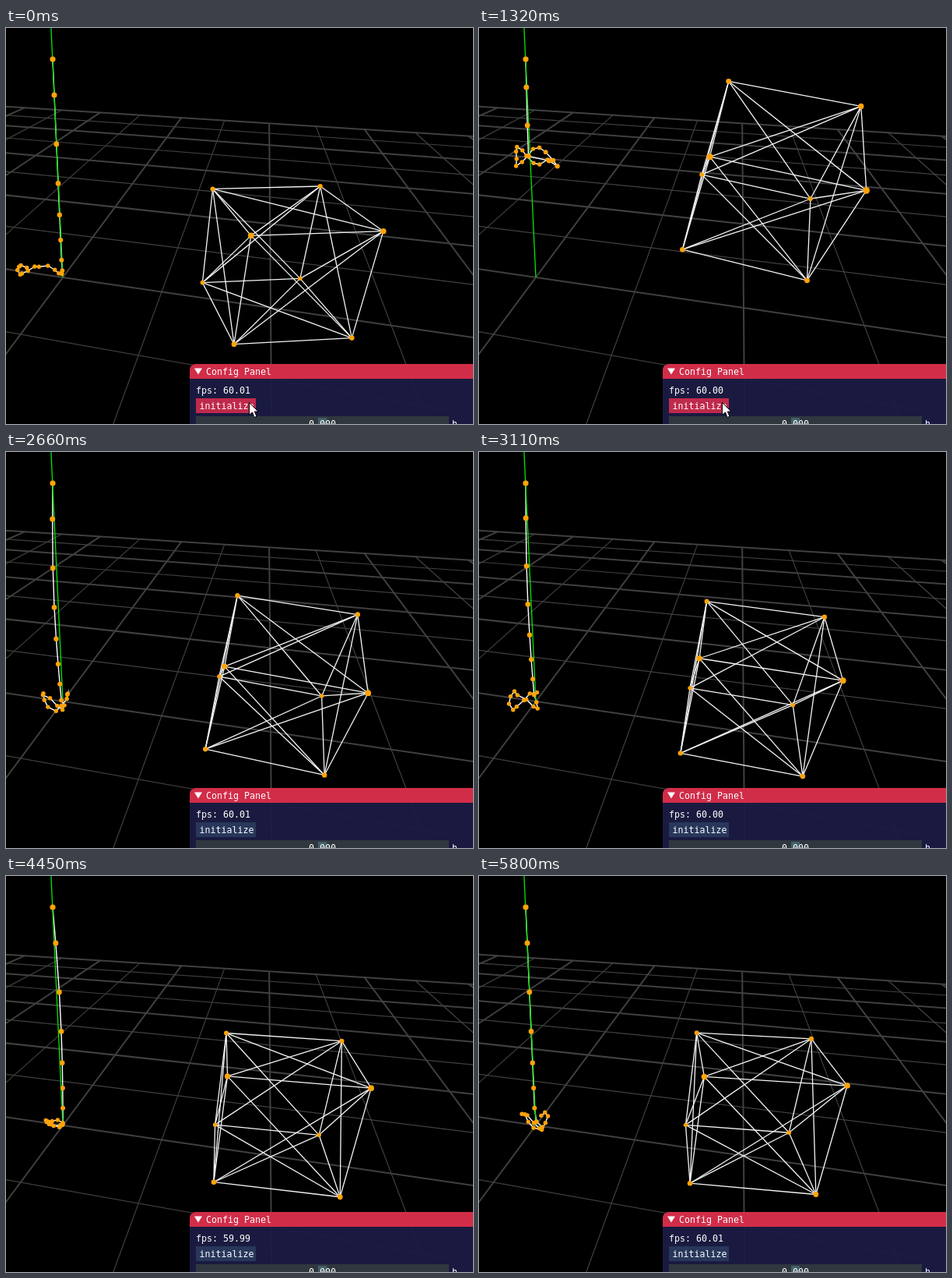
An HTML page with a canvas for the animation above (5900 ms loop, 600 by 508 pixels).

```html
<!DOCTYPE html>
<html lang="en">
<head>
<meta charset="utf-8">
<title>Spring simulation</title>
<style>
html, body { margin: 0; width: 100%; height: 100%; overflow: hidden; background: #000; }
canvas { display: block; }
</style>
</head>
<body>
<canvas id="stage" width="600" height="508"></canvas>
<script>
const ctx = document.getElementById('stage').getContext('2d');
const LOOP = 5900, STEP = 88.6, LAST_STEP = 65;
const RESET = 11.3, LEAVE = 22, NODES = 21;
const mix = (a, b, k) => a + (b - a) * k;

// z, yaw, pitch, roll: cube height and angles in degrees; drop: bounce after this key.
// x, y, rx, ry: centre and half size of the coiled rope end; bow: sideways bend.
const rest = { at: 0, fps: 60.01, z: 0.5, yaw: 21, pitch: 0, roll: 0, drop: 0,
  bow: 0, stretch: 1, x: 45, y: 311, rx: 30, ry: 6 };
const falling = { at: 15, fps: 60, z: 1.236, yaw: 0, pitch: 22, roll: 8, drop: 0.6,
  bow: -2, stretch: 0.78, x: 76, y: 165, rx: 30, ry: 11 };
const start = { ...falling, at: RESET, z: 2.25, y: 42, drop: 0 };
const keys = [
  rest,
  { ...rest, at: RESET, yaw: 23 },
  start,
  falling,
  { ...rest, at: 22, fps: 60.02, z: 0.828, yaw: 2, pitch: -6, roll: -1.5, drop: 0.25,
    stretch: 1.03, x: 72, y: 305, rx: 18, ry: 7 },
  { ...rest, at: 30, z: 0.514, yaw: 0.5, pitch: 15, roll: 4.5, drop: 0.05,
    bow: -5, x: 63, y: 321, rx: 17, ry: 11 },
  { ...rest, at: 40, fps: 59.99, z: 0.48, yaw: 2.5, roll: 1.8,
    bow: -3, stretch: 0.95, x: 55, y: 318, rx: 24, ry: 11 },
  { ...rest, at: 50, fps: 59.99, z: 0.49, yaw: 4.5, bow: 4, x: 62, y: 318, rx: 11, ry: 4 },
  { ...rest, at: 65, yaw: 7.4, x: 72, y: 315, rx: 16, ry: 11 }
];

function stateAt(step) {
  let n = 0;
  while (n < keys.length - 2 && keys[n + 1].at <= step) n++;
  const a = keys[n], b = keys[n + 1];
  const u = (step - a.at) / (b.at - a.at);
  const ease = a === start ? u * u : a === falling ? u : u * u * (3 - 2 * u);
  const state = {};
  for (const name in a) state[name] = mix(a[name], b[name], ease);
  state.z -= a.drop * Math.sin(2 * Math.PI * u) * (1 - u);
  if (a === falling) {
    const landing = 1 - (1 - u) * Math.exp(-3 * u) * Math.abs(Math.cos(8 * u));
    state.y = mix(a.y, b.y, landing);
  }
  return state;
}

// World units are floor squares: u right, v away, z up.
function project(u, v, z = 0) {
  const w = -0.272 * u + v - 0.55 * z + 5.86;
  return [(689.8 * u + 337 * v - 70 * z + 427.8) / w,
          (16.8 * u - 35 * v - 808 * z + 1875) / w, w];
}

function spin(a, b, degrees) {
  const c = Math.cos(degrees * Math.PI / 180), s = Math.sin(degrees * Math.PI / 180);
  return [a * c - b * s, a * s + b * c];
}

// Corner index bits: 1 = right, 2 = front, 4 = bottom.
function corner(i, { z: height, yaw, pitch, roll }) {
  let x = i & 1 ? 0.5 : -0.5, y = i & 2 ? -0.5 : 0.5, z = i & 4 ? -0.5 : 0.5;
  [y, z] = spin(y, z, pitch);
  [z, x] = spin(z, x, roll);
  [x, y] = spin(x, y, yaw);
  return project(2 + x, y, height + z);
}

function noise(i) {
  const n = Math.sin(i * 12.9898) * 43758.5453;
  return n - Math.floor(n) - 0.5;
}

// The rope hangs with shrinking gaps, then coils where it reaches the ground.
function ropeNode(i, { bow, stretch, x, y, rx, ry }) {
  const ground = 40 + (y - 40) / stretch;
  const first = 1 + Math.log((401 - ground) / 315) / Math.log(0.8);
  const hang = Math.max(40, 401 - 315 * 0.8 ** (Math.min(i, first) - 1));
  const hangY = 40 + (hang - 40) * stretch;
  const hangX = 60 + (hangY - 40) * 0.044 + bow * Math.sin(Math.PI * (hangY - 40) / 300);
  const k = Math.max(0, i - first), coil = Math.min(1, k / 1.5);
  return [
    mix(hangX, x + rx * Math.cos(k * 9 / rx) + 4 * noise(i), coil),
    mix(hangY, y + ry * Math.sin(k * 0.9) + 4 * noise(i + 50), coil)
  ];
}

function line(points, color, width) {
  ctx.beginPath();
  points.forEach(([x, y]) => ctx.lineTo(x, y));
  ctx.strokeStyle = color;
  ctx.lineWidth = width;
  ctx.stroke();
}

function dot([x, y], r) {
  ctx.beginPath();
  ctx.arc(x, y, r, 0, 7);
  ctx.fillStyle = '#ffa30a';
  ctx.fill();
}

function box(x, y, w, h, color, radius = 0) {
  ctx.beginPath();
  ctx.roundRect(x, y, w, h, radius);
  ctx.fillStyle = color;
  ctx.fill();
}

function polygon(points, x, y, color) {
  ctx.beginPath();
  points.forEach(([px, py]) => ctx.lineTo(x + px, y + py));
  ctx.closePath();
  ctx.fillStyle = color;
  ctx.fill();
}

function label(text, x, y) {
  ctx.font = '11.63px "DejaVu Sans Mono", monospace';
  ctx.fillStyle = '#fff';
  ctx.fillText(text, x, y);
}

function drawFloor() {
  const stroke = (from, to, n) => line([from, to], '#404040', n % 2 ? 1.2 : 2);
  for (let n = -8; n <= 8; n++) {
    stroke(project(n, -3), project(n, 8), n);
    if (n >= -3) stroke(project(-8, n), project(8, n), n);
  }
}

function drawRope(state) {
  const rope = Array.from({ length: NODES }, (_, i) => ropeNode(i, state));
  line(rope, '#fff', 1.4);
  line([project(0, 0), project(0, 0, 2.5)], '#00e600', 1.3);
  rope.forEach((p, i) => dot(p, Math.max(2.7, 3.6 - i * 0.1)));
}

function drawCube(state) {
  const cube = Array.from({ length: 8 }, (_, i) => corner(i, state));
  // Every pair is joined except opposite corners.
  for (let i = 0; i < 8; i++)
    for (let j = i + 1; j < 8; j++)
      if ((i ^ j) !== 7) line([cube[i], cube[j]], '#f4f4f4', 1.3);
  cube.forEach(p => dot(p, 16 / p[2]));
}

function drawPanel(step, fps) {
  box(236, 431, 380, 90, 'rgba(28, 28, 68, 0.94)', [8, 0, 0, 0]);
  box(236, 431, 380, 19, '#d12d49', [8, 0, 0, 0]);
  polygon([[0, 0], [10, 0], [5, 8]], 242, 436.5, '#fff');
  label('Config Panel', 257, 445);
  label('fps: ' + fps.toFixed(2), 244, 469);
  const pressed = step === 10 || step === 11;
  box(244, 475, 77, 19, step >= LEAVE ? '#28375a' : pressed ? '#dc3653' : '#bf2a4b');
  label('initialize', 248.5, 489);
  box(244, 498, 325, 19, '#31373f');
  box(401, 500, 11, 15, '#42606a');
  label('0.000', 389, 512);
  label('h', 573, 512);
}

function drawCursor(step) {
  if (step > LEAVE) return;
  const [x, y] = step < LEAVE ? [312.5, 480.5] : [443.5, 497.5];
  const arrow = [[0, 0], [0, 16], [4, 12.5], [6.5, 19], [9.5, 17.8], [6.8, 11.5], [11.5, 11.5]];
  polygon(arrow, x, y, '#fff');
  ctx.strokeStyle = '#000';
  ctx.lineWidth = 1;
  ctx.stroke();
}

function draw(now) {
  const step = Math.min(LAST_STEP, Math.floor((now % LOOP) / STEP + 0.12));
  const state = stateAt(step);
  ctx.fillStyle = '#000';
  ctx.fillRect(0, 0, 600, 508);
  drawFloor();
  drawRope(state);
  drawCube(state);
  drawPanel(step, state.fps);
  drawCursor(step);
  requestAnimationFrame(draw);
}
requestAnimationFrame(draw);
</script>
</body>
</html>
```
